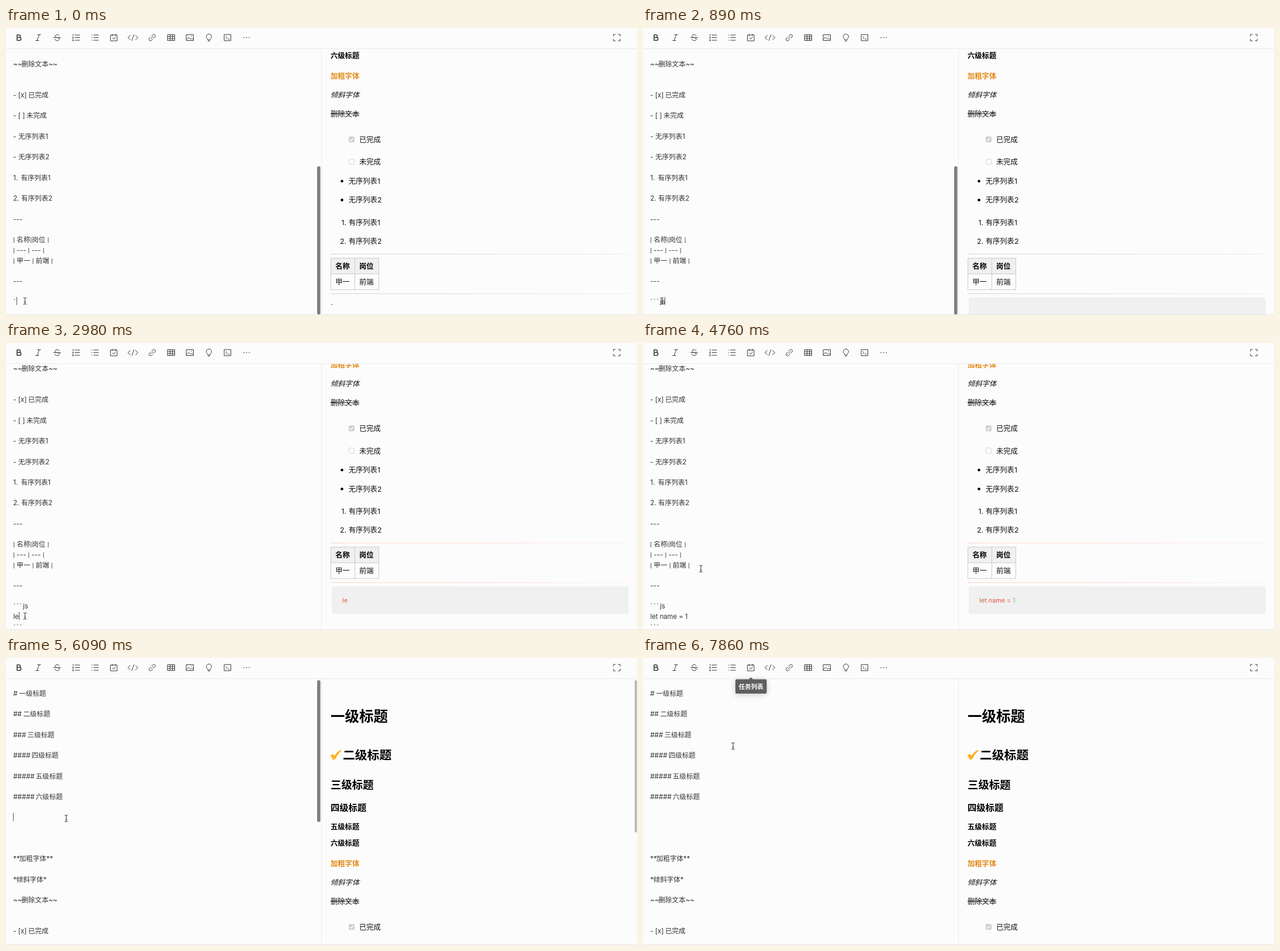
Recreate the animation shown at these times as an HTML page. Size 1079 by 492 pixels, loop 8 s.

```html
<!DOCTYPE html>
<html lang="zh-CN">
<head>
<meta charset="utf-8">
<title>Markdown editor</title>
<style>
  html, body { margin: 0; width: 100%; height: 100%; overflow: hidden; background: #fcfcfc; }
  svg { display: block; width: 100%; height: 100%; }
  text { font-family: Inter, "Noto Sans CJK SC", "Noto Sans CJK", sans-serif; white-space: pre; }
  #source text { font-size: 11.55px; fill: #333; }
  #source .pipe { font-family: Roboto, sans-serif; }
  #preview text { font-size: 12.3px; fill: #111; }
  #preview .bold { font-weight: 700; fill: #000; }
  #icons path { fill: none; stroke: #3a3a3a; stroke-linecap: round; stroke-linejoin: round; }
  #tooltip { filter: drop-shadow(0 2px 5px #0003); }
</style>
</head>
<body>
<svg viewBox="0 0 1079 492" preserveAspectRatio="none">
  <defs>
    <linearGradient id="grayRule"><stop stop-color="#d4d4d4"/><stop offset="1" stop-color="#ececec"/></linearGradient>
    <linearGradient id="pinkRule"><stop stop-color="#ffcfc0"/><stop offset="1" stop-color="#faeeea"/></linearGradient>
    <clipPath id="leftPane"><path d="M0 36H539V485H0Z"/></clipPath>
    <clipPath id="rightPane"><path d="M540 36H1079V492H540Z"/></clipPath>
  </defs>
  <rect width="1079" height="492" fill="#fcfcfc"/>
  <g clip-path="url(#leftPane)"><g id="source"></g></g>
  <g clip-path="url(#rightPane)"><g id="preview"></g></g>
  <path d="M0 35.5H1079M539.5 36V492" stroke="#e9e9e9"/>
  <path d="M0 491.6H1079" stroke="#e2e2e2"/>
  <rect id="leftBar" x="532" width="5.6" rx="2.8" fill="#7f7f7f"/>
  <rect id="rightBar" x="1075" width="5.6" height="261" rx="2.8" fill="#7f7f7f"/>
  <rect id="hover" x="174" y="6" width="21" height="21" rx="3" fill="#e9e9e9"/>
  <g id="icons"></g>
  <g id="tooltip">
    <path d="M181 36.5L184.5 33L188 36.5H209.5Q211.5 36.5 211.5 38.5V59Q211.5 61 209.5 61H160Q158 61 158 59V38.5Q158 36.5 160 36.5Z" fill="#5f5f5f"/>
    <text x="163.7" y="52.8" font-size="10.5" font-weight="700" fill="#fff">任务列表</text>
  </g>
  <g id="mouse">
    <path id="beam" d="M-2.7 -5.8Q0 -5.8 0 -4Q0 -5.8 2.7 -5.8M0 -4V4M-2.7 5.8Q0 5.8 0 4Q0 5.8 2.7 5.8M-1.3 2.2H1.3" fill="none" stroke="#333"/>
    <path id="hand" d="M-3 1V-5Q-3 -6.3 -2 -6.3Q-1 -6.3 -1 -5V-1.5Q0 -2.6 1 -1.2Q2.2 -2 3 -.7Q4.8 -1.2 4.8 .8V3Q4.8 5 3.8 7H-2Q-3 4.8 -5.2 2.2Q-5.6 .4 -3 1Z" fill="#fff" stroke="#222" stroke-linejoin="round"/>
  </g>
</svg>
<script>
const LOOP = 8000;
const byId = id => document.getElementById(id);
const source = byId('source'), preview = byId('preview');

function add(parent, tag, attrs, content = '') {
  const node = document.createElementNS('http://www.w3.org/2000/svg', tag);
  for (const name in attrs) node.setAttribute(name, attrs[name]);
  node.textContent = content;
  parent.append(node);
  return node;
}
const set = (node, name, value) => node.setAttribute(name, value);
const show = (node, visible) => set(node, 'visibility', visible ? 'visible' : 'hidden');

// Text is placed by the vertical centre of its glyphs.
const label = (parent, x, y, content, size, attrs = {}) =>
  add(parent, 'text', { x, y: y + size * .38, ...attrs }, content);
const md = (x, y, content, attrs) => label(source, x, y, content, 11.55, attrs);
const rich = (x, y, content, attrs) => label(preview, x, y, content, 12.3, attrs);

function tableRow(y, content) {
  const row = md(12.3, y, '');
  for (const part of content.split(/(\|)/)) add(row, 'tspan', { class: part === '|' ? 'pipe' : '' }, part);
}

// Markdown source, in document coordinates
['一', '二', '三', '四', '五', '六'].forEach((number, i) => {
  const hashes = Math.min(i + 1, 5), y = 60.7 + i * 35.4;
  md(12.3, y, '#'.repeat(hashes));
  md(15.3 + hashes * 7.1, y, number + '级标题');
});
md(12.3, 344, '**'); md(22.8, 344, '加粗字体'); md(69, 344, '**');
md(12.3, 379.5, '*'); md(17.6, 379.5, '倾斜字体'); md(63.8, 379.5, '*');
md(12.3, 415, '~~'); md(26.5, 415, '删除文本'); md(72.7, 415, '~~');
[['- [x]', 38, '已完成'], ['- [ ]', 35, '未完成'], ['-', 21, '无序列表1'], ['-', 21, '无序列表2'],
 ['1.', 25.4, '有序列表1'], ['2.', 26, '有序列表2'], ['---', 30, '']].forEach(([mark, x, words], i) => {
  md(12.3, 468 + i * 35.45, mark);
  md(x, 468 + i * 35.45, words);
});
tableRow(716.3, '| 名称|岗位 |');
tableRow(734, '| --- | --- |');
tableRow(751.7, '| 甲一 | 前端 |');
md(12.3, 787, '---');
const ticks = [0, 1, 2].map(i => md(12.5 + i * 5.4, 822, '`'));
const language = md(29, 822, '');
const codeLine = md(12.5, 839.7, '', { style: 'font-size:11.25px' });
const closing = [0, 1, 2].map(i => md(12.5 + i * 5.4, 857.4, '`'));
const caret = add(source, 'rect', { width: 1, height: 14, fill: '#555' });

// Rendered preview, in document coordinates
[['一级标题', 555, 100, 24.5], ['二级标题', 576, 166, 20.8], ['三级标题', 555, 217, 18.4],
 ['四级标题', 555, 255.7, 15.3], ['五级标题', 555, 289, 12.3], ['六级标题', 555, 317, 12.3]].forEach(([words, x, y, size]) =>
  label(preview, x, y, words, size, { class: 'bold', style: `font-size:${size}px` }));
add(preview, 'path', { d: 'M554.8 167.6L558.8 164.2Q560.4 165.6 561.4 168Q566 160.5 572.6 157.4L573.6 158.8Q567 165 562.7 173.6L558.8 174.6Q557.4 170.4 554.8 167.6Z', fill: '#ffb11b' });
rich(555, 352, '加粗字体', { class: 'bold', style: 'fill:#e58a18' });
rich(555, 384.5, '倾斜字体', { 'font-style': 'italic' });
rich(555, 417, '删除文本');
add(preview, 'rect', { x: 555, y: 416.5, width: 49.2, height: .9, fill: '#111' });

add(preview, 'rect', { x: 586, y: 456, width: 10, height: 10, rx: 2, fill: '#d0d0d0' });
add(preview, 'path', { d: 'M588.3 461.2L590.2 463.2L593.8 458.6', fill: 'none', stroke: '#fff', 'stroke-width': 1.4 });
add(preview, 'rect', { x: 586.5, y: 494.7, width: 9, height: 9, rx: 2, fill: '#fff', stroke: '#d0d0d0' });
rich(604, 461.3, '已完成');
rich(604, 499.8, '未完成');
[1, 2].forEach(n => {
  const bullet = 499.8 + n * 32.4, ordered = 570.5 + n * 32.4;
  add(preview, 'circle', { cx: 574.5, cy: bullet + .3, r: 2.3, fill: '#000' });
  rich(585.7, bullet, '无序列表' + n);
  rich(582, ordered, n + '.', { 'text-anchor': 'end' });
  rich(585.7, ordered, '有序列表' + n);
});
// Filled rects, since a gradient cannot paint a flat stroke
const rules = [657, 725].map(y => add(preview, 'rect', { x: 555, y, width: 509, height: 1 }));
add(preview, 'path', { d: 'M555.5 664.5H637.5V691.5H555.5Z', fill: '#f0f0f0' });
add(preview, 'path', { d: 'M555.5 664.5H637.5V718.5H555.5ZM555.5 691.5H637.5M596.5 664.5V718.5', fill: 'none', stroke: '#ccc' });
rich(563.3, 678.5, '名称', { class: 'bold' });
rich(604, 678.5, '岗位', { class: 'bold' });
rich(563.3, 705.5, '甲一');
rich(604, 705.5, '前端');
const rawTicks = rich(555, 747, '');
const codeBox = add(preview, 'rect', { x: 557, y: 732, width: 507.5, height: 47, rx: 3, fill: '#f0f0f0' });
const codeText = add(preview, 'text', { x: 575.3, y: 760, style: 'font-size:10.8px' });
const tokens = ['#c9663c', '#e8553f', '#7cbb6a'].map(color => add(codeText, 'tspan', { fill: color }));

// Toolbar icons, each drawn around its own centre
const icons = {
  22: 'M-3 -4.7H.7A2.3 2.3 0 0 1 .7 -.2H-3ZM-3 -.2H1.2A2.4 2.4 0 0 1 1.2 4.7H-3Z',
  55: 'M-1 -5H4.2M-4.2 5H1M1.8 -5L-1.8 5',
  87.5: 'M3.6 -3.2C2.5 -6 -3.7 -5.7 -3.5 -2.5C-3.3 -.6 -1 -.2 0 0C2 .4 3.9 1 3.7 2.8C3.4 5.9 -3 6 -3.9 2.8M-6 0H6',
  120: 'M-2 -4.5H6M-2 0H6M-2 4.5H6M-5.5 -5.5H-5V-3.3M-6 -1H-5L-6 1.1H-4.8M-6 3.5H-4.9V5.5H-6M-5.5 4.5H-4.9',
  152: 'M-2 -4.5H6M-2 0H6M-2 4.5H6M-5.5 -4.5H-5M-5.5 0H-5M-5.5 4.5H-5',
  184.5: 'M-5.5 -4.5H5.5V5.5H-5.5ZM-2.7 -6V-3.3M2.7 -6V-3.3M-2.5 .7L-.5 2.6L2.8 -1',
  217: 'M-4.5 -3.7L-8.5 0L-4.5 3.7M4.5 -3.7L8.5 0L4.5 3.7M1.7 -5L-1.7 5',
  250: 'M-1.9 1.9L1.9 -1.9M-.8 -2.8L1.5 -5A2.5 2.5 0 0 1 5 -1.5L2.8 .8M.8 2.8L-1.5 5A2.5 2.5 0 0 1 -5 1.5L-2.8 -.8',
  282.5: 'M-6 -5H6V5H-6ZM-6 -1.7H6M-6 1.7H6M-2 -5V5M2 -5V5',
  314.5: 'M-6 -5H6V5H-6ZM-6 3L-2 -.5L1.5 3L3.5 1L6 3.5M2.5 -2.2H3',
  347: 'M-2 3.5C-2 1.5 -4.5 .8 -4.5 -1.7A4.5 4.5 0 0 1 4.5 -1.7C4.5 .8 2 1.5 2 3.5ZM-1.5 5.8H1.5',
  379: 'M-5.5 -5.3H5.5V5.3H-5.5ZM-3 -2L-1 0L-3 2M.5 2.5H3',
  411.5: 'M-4.6 0H-4.4M-.1 0H.1M4.4 0H4.6',
  1044.5: 'M-5.7 -2.5V-5.5H-2.5M2.5 -5.5H5.7V-2.5M5.7 2.5V5.5H2.5M-2.5 5.5H-5.7V2.5'
};
const boldIcons = { 22: 1.6, 411.5: 1.6 };
for (const x in icons)
  add(byId('icons'), 'path', { d: icons[x], transform: `translate(${x} 16.5)`, 'stroke-width': boldIcons[x] ?? 1 });

// Timelines: each value holds until the next time.
const timelines = {
  tickCount: [[0, 1], [300, 2], [600, 3]],
  language: [[0, ''], [740, 'j'], [890, 'js']],
  code: [[0, ''], [2830, 'l'], [2980, 'le'], [3130, 'let'], [3270, 'let n'], [3420, 'let na'], [3570, 'let name'],
         [3720, 'let name '], [3860, 'let name ='], [4010, 'let name = '], [4160, 'let name = 1']],
  leftScroll: [[0, 353.5], [1190, 371.2], [5060, 180], [5210, 0]],
  rightScroll: [[0, 270], [1190, 285], [1340, 305], [1490, 314.7], [5060, 150], [5210, 0]],
  leftBar: [[0, 1], [2380, .5], [2530, 0], [5060, 1], [7420, .5], [7570, 0]],
  rightBar: [[0, 0], [1190, 1], [1930, .5], [2080, 0], [5060, 1], [6090, .5], [6240, 0]],
  caret: [[0, 1], [1640, 0], [2080, 1], [2530, 0], [2830, 1], [4610, 0], [5800, 1], [6240, 0], [6830, 1], [7710, 0]],
  mouse: [[0, [32.5, 468]], [4610, [78, 432]], [4760, [99, 387]], [5060, [99, 381]], [5360, [103, 290]],
          [5650, [103, 275]], [6530, [125, 270]], [6680, [157, 235]], [6830, [186, 150]], [6980, [187, 65]],
          [7120, [184, 31]], [7710, [172, 85]], [7860, [154, 151]]],
  hover: [[0, 0], [7120, 1], [7710, 0]],
  tooltip: [[0, 0], [7420, 1]]
};
const valueAt = (steps, t) => steps.findLast(step => step[0] <= t)[1];

function draw(t) {
  const now = {};
  for (const key in timelines) now[key] = valueAt(timelines[key], t);
  const entered = t >= 1190, fenced = now.tickCount === 3;

  set(source, 'transform', `translate(0 ${-now.leftScroll})`);
  set(preview, 'transform', `translate(0 ${-now.rightScroll})`);

  ticks.forEach((tick, i) => show(tick, i < now.tickCount));
  closing.forEach(tick => show(tick, entered));
  language.textContent = now.language;
  codeLine.textContent = now.code;

  rawTicks.textContent = fenced ? '' : '`'.repeat(now.tickCount);
  show(codeBox, fenced);
  const keyword = now.code.startsWith('let') ? 'let' : '';
  const number = now.code.endsWith('1') ? '1' : '';
  tokens[0].textContent = keyword;
  tokens[1].textContent = now.code.slice(keyword.length, now.code.length - number.length);
  tokens[2].textContent = number;
  rules.forEach(rule => set(rule, 'fill', entered ? 'url(#pinkRule)' : 'url(#grayRule)'));

  let caretX = 12.3, caretY = 273;
  if (!entered) {
    caretX = now.language ? 28.5 + language.getComputedTextLength() : 12.3 + now.tickCount * 5.4;
    caretY = 822;
  } else if (t < 5060) {
    caretX = 12.3 + codeLine.getComputedTextLength();
    caretY = 839.7;
  }
  set(caret, 'x', Math.round(caretX));
  set(caret, 'y', caretY - 7.5);
  show(caret, now.caret);

  const leftBar = byId('leftBar'), rightBar = byId('rightBar');
  set(leftBar, 'y', entered ? 38 + now.leftScroll * .539 : 237);
  set(leftBar, 'height', entered ? 243 : 254);
  set(leftBar, 'opacity', now.leftBar);
  set(rightBar, 'y', 38 + now.rightScroll * .597);
  set(rightBar, 'opacity', now.rightBar);

  show(byId('hover'), now.hover);
  show(byId('tooltip'), now.tooltip);
  show(byId('hand'), now.hover);
  show(byId('beam'), !now.hover);
  set(byId('mouse'), 'transform', `translate(${now.mouse})`);
}

const start = performance.now();
(function frame() {
  draw((performance.now() - start) % LOOP);
  requestAnimationFrame(frame);
})();
</script>
</body>
</html>
```
